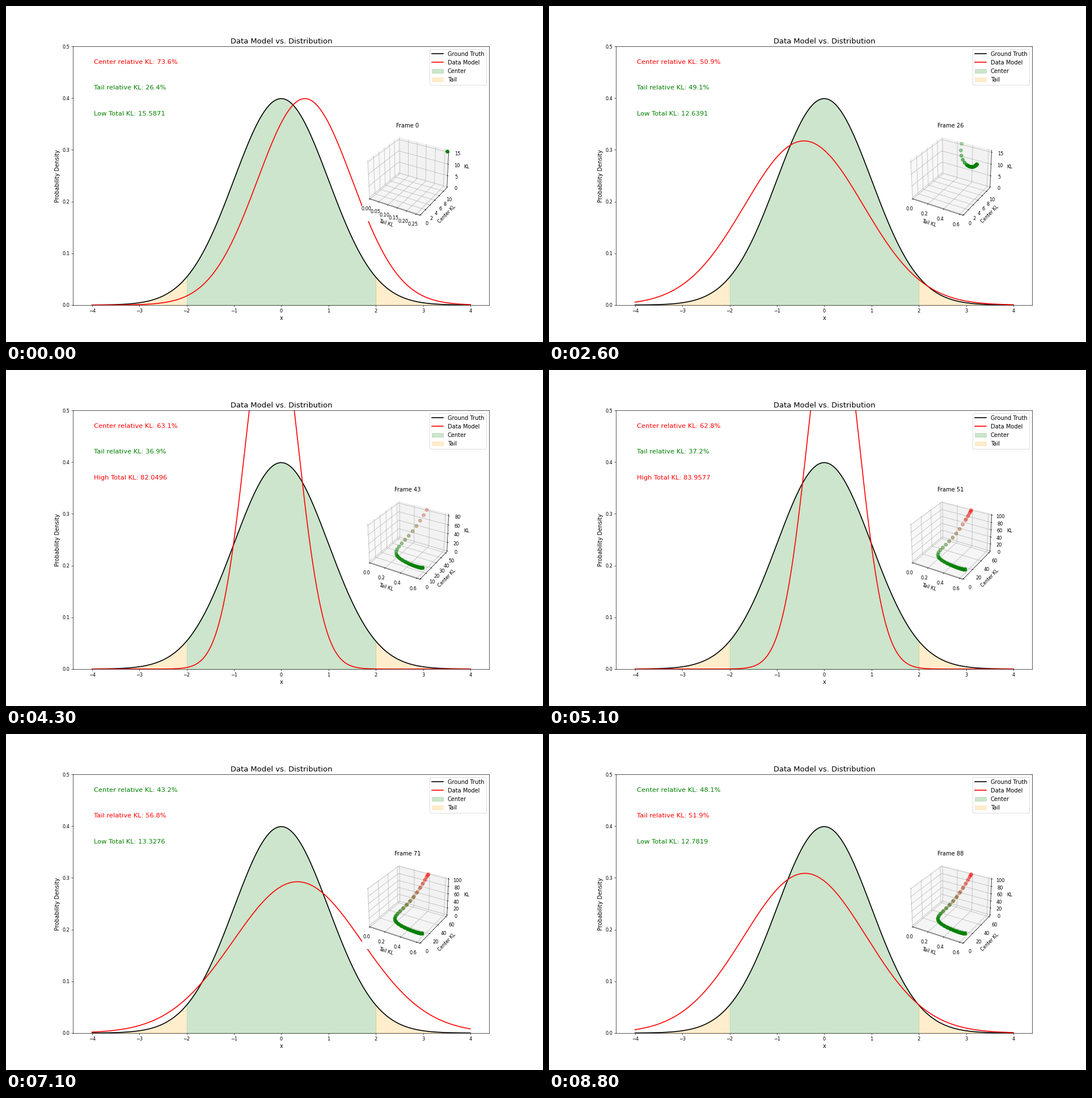
Write a matplotlib script that moves like this. It is 947x592 px and loops after 8900 ms.

```python
import numpy as np
import matplotlib.pyplot as plt
from matplotlib.animation import FuncAnimation
from matplotlib.ticker import MaxNLocator

W, H, DPI = 947, 592, 947 / 16
FRAMES, INTERVAL = 89, 100
HIGH_KL = 20


def gauss(x, mean=0.0, std=1.0):
    return np.exp(-((x - mean) / std) ** 2 / 2) / (std * np.sqrt(2 * np.pi))


x = np.linspace(-4, 4, 1000)
truth = gauss(x)
center = np.abs(x) <= 2


def model(i):
    t = 0.1 * i
    return gauss(x, 0.5 * np.cos(t), 1 + 0.5 * np.sin(t))


def divergence(q):
    """Return relative tail, absolute center and total divergence."""
    kl = truth * np.log(truth / q) - truth + q
    total = kl.sum()
    return kl[~center].sum() / total, kl[center].sum(), total


history = np.array([divergence(model(i)) for i in range(FRAMES)])

fig = plt.figure(figsize=(W / DPI, H / DPI), dpi=DPI)
ax = fig.add_subplot()
ax.plot(x, truth, color="black", lw=2, label="Ground Truth")
curve, = ax.plot(x, model(0), color="red", lw=2, label="Data Model")
ax.fill_between(x, truth, where=center, color="green", alpha=0.2, label="Center")
ax.fill_between(x, truth, where=~center, color="orange", alpha=0.2, label="Tail")
ax.set_xlim(-4.4, 4.4)
ax.set_ylim(0, 0.5)
ax.set_title("Data Model vs. Distribution", fontsize=16)
ax.set_xlabel("x", fontsize=12)
ax.set_ylabel("Probability Density", fontsize=12)
ax.legend(loc="upper right", fontsize=12)
notes = [ax.text(0.05, y, "", transform=ax.transAxes, fontsize=14, va="top")
         for y in (0.95, 0.85, 0.75)]

side = 160
box = fig.add_axes([628 / W, 1 - 379 / H, side / W, side / H], projection="3d")
box.set_xlabel("Tail KL")
box.set_ylabel("Center KL")
box.set_zlabel("KL")
locator = MaxNLocator(6, steps=[1, 2, 2.5, 5, 10])
dots = None


def fit_axis(axis, set_lim, top):
    ticks = locator.tick_values(0, top)
    axis.set_ticks(ticks[(ticks >= 0) & (ticks <= top)])
    set_lim(-top / 48, top * 49 / 48)


def note(text, label, bad):
    text.set_text(label)
    text.set_color("red" if bad else "green")


def update(i):
    global dots
    curve.set_ydata(model(i))
    tail, _, total = history[i]
    note(notes[0], f"Center relative KL: {1 - tail:.1%}", tail < 0.5)
    note(notes[1], f"Tail relative KL: {tail:.1%}", tail > 0.5)
    high = total > HIGH_KL
    note(notes[2], f"{'High' if high else 'Low'} Total KL: {total:.4f}", high)

    if dots is not None:
        dots.remove()
    past = history[:i + 1]
    heat = np.clip((past[:, 2] - HIGH_KL) / (100 - HIGH_KL), 0, 1)
    colors = np.column_stack([heat, (1 - heat) * 128 / 255, 0 * heat])
    dots = box.scatter(*past.T, c=colors, s=50)
    tops = past.max(axis=0)
    fit_axis(box.xaxis, box.set_xlim, tops[0])
    fit_axis(box.yaxis, box.set_ylim, tops[1])
    fit_axis(box.zaxis, box.set_zlim, tops[2])
    box.set_title(f"Frame {i}")


anim = FuncAnimation(fig, update, frames=FRAMES, interval=INTERVAL)
plt.show()
```
